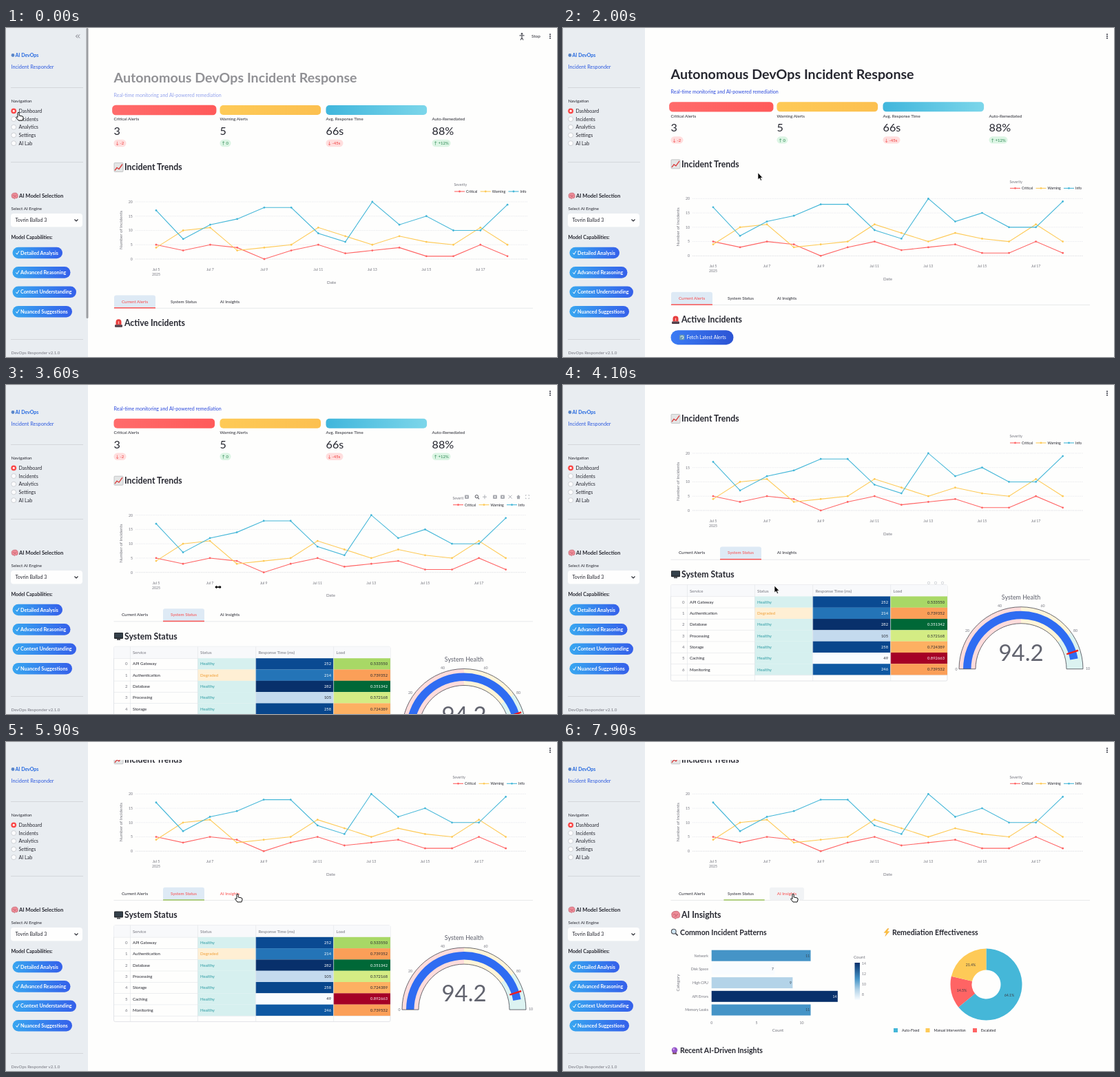
Animation of 800 by 477 pixels, one loop 8000 ms. Source, as an HTML page:

```html
<!DOCTYPE html>
<html lang="en">
<head>
<meta charset="utf-8">
<title>Incident dashboard</title>
<style>
html, body { margin: 0; width: 100%; height: 100%; overflow: hidden; background: #fefefd; }
svg { display: block; width: 800px; height: 477px; font-family: Lato, "DejaVu Sans", sans-serif; fill: #262730; }
.b { font-weight: 700; }
.m { text-anchor: middle; }
.e { text-anchor: end; }
</style>
</head>
<body>
<svg id="stage" viewBox="0 0 800 477"></svg>
<script>
const INK = '#262730', RED = '#ff6464', YELLOW = '#feca57', BLUE = '#45b7d8', GREY = '#74757e', PAGE = '#fefefd';

// Drawing helpers: y of a text is the middle of its capitals
const text = (x, y, size, s, fill = INK, cls = '', more = '') =>
  `<text x="${x}" y="${y + size * .36}" font-size="${size}" fill="${fill}" class="${cls}" ${more}>${s}</text>`;
const rect = (x, y, w, h, fill, r = 0, more = '') =>
  `<rect x="${x}" y="${y}" width="${w}" height="${h}" rx="${r}" fill="${fill}" ${more}/>`;
const dot = (x, y, r, fill, more = '') => `<circle cx="${x}" cy="${y}" r="${r}" fill="${fill}" ${more}/>`;
const path = (d, stroke, w = 1, fill = 'none', more = '') =>
  `<path d="${d}" stroke="${stroke}" stroke-width="${w}" fill="${fill}" ${more}/>`;
const group = (id, body, more = '') => `<g id="${id}" ${more}>${body}</g>`;
const each = (list, fn) => list.map(fn).join('');
const gradient = (id, a, b) =>
  `<linearGradient id="${id}"><stop stop-color="${a}"/><stop offset="1" stop-color="${b}"/></linearGradient>`;

// Ring sector, angles in radians clockwise from the top
function sector(cx, cy, r0, r1, a, b, fill, stroke = 'none', w = 0) {
  const p = (r, t) => `${cx + r * Math.sin(t)} ${cy - r * Math.cos(t)}`;
  const big = b - a > Math.PI ? 1 : 0;
  return path(`M${p(r1, a)}A${r1} ${r1} 0 ${big} 1 ${p(r1, b)}L${p(r0, b)}A${r0} ${r0} 0 ${big} 0 ${p(r0, a)}Z`, stroke, w, fill);
}

// Small heading symbols, 13 units wide
const icons = {
  chart: rect(0, 0, 13, 13, '#e4e6e6', 1, 'stroke="#a8aaac" stroke-width=".6"') + path('M1 11L4 7L7 9L12 2', '#d83a3a', 1.3),
  siren: path('M2.5 9V5a4 4 0 0 1 8 0v4z', 'none', 0, '#e63c3c') + rect(1, 9, 11, 3.5, '#54404a', 1) + path('M6.5 4v4', '#ffb7b0', 1.4),
  brain: path('M1 7C0 3 3 1 6 1C10 0 13 3 12.5 7C13 10 10 11 8 10.5C7 12.5 5 12 4.5 10.5C2 11 1 9 1 7Z', '#b8505e', .7, '#ec8c98')
    + path('M3 6q2-2 3 0t4-1M5 9q1-2 3-1', '#b8505e', .7),
  screen: rect(0, 1, 13, 9, '#26282c', 1) + rect(1, 2, 11, 6.5, '#34404a') + rect(4, 10, 5, 2, '#505258'),
  lens: path('M8 8L12 12', '#44464c', 2) + dot(5, 5, 4, '#cfe6f4', 'stroke="#505258" stroke-width="1.2"'),
  bolt: path('M8 0L2 7H6L4 13L11 5H7L10 0Z', '#e89a30', .5, '#ffc23a'),
  orb: rect(3, 9.5, 7, 3, '#6a4640', 1) + dot(6.5, 5.5, 5, '#9456c8') + dot(5, 4, 1.5, '#d8a8f0')
};
const icon = (name, x, y, k = 1) => `<g transform="translate(${x} ${y - 6.5 * k}) scale(${k})">${icons[name]}</g>`;
const heading = (name, y, s) => icon(name, 157, y) + text(172, y, 12.3, s, INK, 'b');
const subheading = (name, x, y, s) => icon(name, x, y, .85) + text(x + 13.5, y, 10.6, s, INK, 'b');

function sidebar() {
  const nav = ['Dashboard', 'Incidents', 'Analytics', 'Settings', 'AI Lab'];
  const skills = [['Detailed Analysis', 72.5], ['Advanced Reasoning', 84], ['Context Understanding', 92.5], ['Nuanced Suggestions', 86.5]];
  return rect(0, 0, 119, 477, '#e9edf1')
    + dot(10, 39.5, 2.4, '#5a86c8') + text(13.5, 39.5, 7, 'AI DevOps', '#2468e0', 'b')
    + text(7.5, 56, 7.3, 'Incident Responder', '#2f5ce0')
    + each([86, 194, 451], y => rect(7, y, 105, .8, '#d0d3d6'))
    + text(7.5, 106, 6.35, 'Navigation')
    + each(nav, (s, i) => {
      const y = 120.3 + i * 11.7;
      return (i ? dot(11.2, y, 3.5, '#fdfdfe', 'stroke="#c4c7cc" stroke-width=".8"') : dot(11.2, y, 3.9, '#fa4848') + dot(11.2, y, 1.5, '#fff'))
        + text(18.5, y, 7.1, s);
    })
    + icon('brain', 7.5, 243.5, .78) + text(19, 243.5, 7.6, 'AI Model Selection', INK, 'b')
    + text(7.5, 261.5, 6.3, 'Select AI Engine')
    + rect(7, 269, 104, 19.5, '#fefefe', 4) + text(13.5, 278.5, 7.1, 'Tovrin Ballad 3')
    + path('M99.5 277.5l2.5 2.5l2.5-2.5', INK, 1.1)
    + text(7.5, 303.5, 7.05, 'Model Capabilities:', INK, 'b')
    + each(skills, ([s, w], i) => {
      const y = 326 + i * 28.4;
      return rect(9.5, y - 8.3, w, 16.6, 'url(#pill)', 8.3) + path(`M14.5 ${y}l1.6 2.2l3-5`, '#fff', 1)
        + text(21, y, 7.2, s, '#fff', 'b');
    })
    + text(7.5, 471, 6.2, 'DevOps Responder v2.1.0', GREY);
}

function metrics() {
  const cards = [
    ['Critical Alerts', '3', '↓ -2', 18], ['Warning Alerts', '5', '↑ 0', 16],
    ['Avg. Response Time', '66s', '↓ -45s', 25], ['Auto-Remediated', '88%', '↑ +12%', 27]];
  return each(cards, ([label, value, delta, w], i) => {
    const x = 156.5 + i * 154, down = delta[0] === '↓';
    return (i < 3 ? rect(x, 112, 146.6, 14, `url(#card${i})`, 5, `id="bar${i}"`) : '')
      + text(x, 132, 6.2, label) + text(x, 149, 16.2, value)
      + rect(x, 161.8, w, 10.4, down ? '#ffdede' : '#dcf5e4', 5.2)
      + text(x + 3, 167, 6, delta, down ? '#f03838' : '#208048');
  });
}

function trends() {
  const series = [
    ['Critical', RED, [5, 3, 5, 4, 0, 3, 5, 2, 3, 4, 1, 1, 5, 1], 649],
    ['Warning', YELLOW, [4, 10, 11, 3, 4, 5, 11, 8, 5, 8, 6, 5, 11, 5], 686.5],
    ['Info', BLUE, [17, 7, 12, 14, 18, 18, 9, 6, 20, 12, 15, 10, 10, 19], 727]];
  const X = i => 218 + i * 39.05, Y = v => 335 - v * 4.15;
  return each([0, 5, 10, 15, 20], v =>
      path(`M188 ${Y(v)}H755`, v ? '#e6e8ec' : '#d8dadf', .8, 'none', 'stroke-dasharray="1.5 1"') + text(184, Y(v), 5.2, v, GREY, 'e'))
    + each([5, 7, 9, 11, 13, 15, 17], d => text(X(d - 5), 350, 5.2, 'Jul ' + d, GREY, 'm'))
    + text(218, 357, 5.2, '2025', GREY, 'm') + text(471.5, 368.5, 6.2, 'Date', GREY, 'm')
    + text(0, 0, 6.3, 'Number of Incidents', GREY, 'm', 'transform="translate(167 293) rotate(-90)"')
    + text(648.5, 227.5, 5.2, 'Severity', GREY)
    + each(series, ([name, c, data, x]) =>
      path('M' + data.map((v, i) => X(i) + ' ' + Y(v)).join('L'), c, 1.1)
      + each(data, (v, i) => dot(X(i), Y(v), 1.4, c))
      + path(`M${x} 237h15`, c, 1.1) + dot(x + 7.5, 237, 1.4, c) + text(x + 17, 237, 5.2, name));
}

function modebar() {
  return rect(664, 220, 101, 11, PAGE)
    + each([669, 684, 695, 710, 721, 732, 744, 757], (x, i) => {
      const c = i === 1 ? '#55565e' : '#a8aab0';
      if (i === 1) return dot(x - .6, 225, 2.2, 'none', `stroke="${c}"`) + path(`M${x + 1} 226.6l2 2`, c, 1.1);
      if (i === 2) return path(`M${x - 3} 225.5h6m-3-3v6`, c, .9);
      if (i === 5) return path(`M${x - 2.5} 223l5 5m0-5l-5 5`, c, .9);
      if (i === 6) return path(`M${x - 3} 225.5l3-3l3 3h-1v3h-4v-3z`, 'none', 0, c);
      if (i === 7) return rect(x - 2.5, 223, 5, 5, 'none', 0, `stroke="${c}" stroke-dasharray="2 3" stroke-dashoffset="1"`);
      return rect(x - 3, 222.8, 6, 5.4, c, 1) + dot(x, 225.5, 1, PAGE);
    });
}

function alerts() {
  return heading('siren', 427.7, 'Active Incidents')
    + group('fetch', rect(156.5, 442.8, 91, 21, 'url(#button)', 10.5)
      + rect(169, 449.5, 7.5, 7.5, '#6a9cb4', 1.5) + path('M170.8 453a2 2 0 1 1 2 2.2', '#fff', .9)
      + text(179.5, 453.4, 7, 'Fetch Latest Alerts', '#fff'));
}

function status() {
  const rows = [
    ['API Gateway', 252, '#0a4a92', '0.533550', '#a8d866'], ['Authentication', 214, '#2474b7', '0.739352', '#fb9f58'],
    ['Database', 282, '#08306b', '0.351342', '#006837'], ['Processing', 105, '#c4daee', '0.572168', '#d4ec84'],
    ['Storage', 258, '#08468c', '0.724389', '#fdb062'], ['Caching', 49, '#f9fcff', '0.892663', '#a50026'],
    ['Monitoring', 246, '#0e58a2', '0.739532', '#fb9f58']];
  const top = 442.6, rowY = i => 459.5 + i * 16.3, line = '#e2e4e8';
  const cx = 665, cy = 564.8, at = f => (f - .5) * Math.PI;
  const ring = (r0, r1, a, b, c, s, w) => sector(cx, cy, r0, r1, at(a), at(b), c, s, w);
  return heading('screen', 427.7, 'System Status')
    + rect(156.5, top, 401.5, 139.5, 'none', 2, `stroke="${line}"`) + rect(156.5, top, 401.5, 16.9, '#f8f9fb')
    + each([['Service', 184], ['Status', 282], ['Response Time (ms)', 366.5], ['Load', 479.5]], ([s, x]) => text(x, 451.5, 6.1, s, GREY))
    + each(rows, ([name, ms, c, load, lc], i) => {
      const y = rowY(i), mid = y + 8.1, ok = i !== 1, dark = ms > 200, deep = i === 2 || i === 5;
      return rect(278, y, 84.5, 16.4, ok ? '#d6f0ef' : '#ffefd4') + rect(362.5, y, 113, 16.4, c) + rect(475.5, y, 82.5, 16.4, lc)
        + rect(156.5, y, 122, .6, line)
        + text(176.5, mid, 6.1, i, GREY, 'e') + text(184, mid, 6.1, name)
        + text(282, mid, 6.1, ok ? 'Healthy' : 'Degraded', ok ? '#2a9aa2' : '#f0a038')
        + text(472, mid, 5.8, ms, dark ? '#fff' : INK, 'e') + text(554, mid, 5.8, load, deep ? '#fff' : INK, 'e');
    })
    + rect(156.5, rowY(7), 401.5, .6, line) + each([180, 278, 362.5, 475.5], x => rect(x, top, .6, 139.5, line))
    + text(cx, 460.8, 8.9, 'System Health', '#5c5e6a', 'm')
    + ring(66, 90, 0, .5, '#ffdcdc') + ring(66, 90, .5, .8, '#fff4d8') + ring(66, 90, .8, 1, '#dcf3f1')
    + ring(72.5, 84, 0, .942, '#2f6cf2') + ring(66, 90, 0, 1, 'none', '#44464e', .8)
    + ring(70, 87, .897, .903, '#f01c1c', '#f01c1c', 1)
    + each([['0', 571, 388], ['20', 587, 332.5], ['40', 634, 296.5], ['60', 696.5, 296.5], ['80', 744, 332.5], ['10', 762, 387.5]],
      ([s, x, y]) => text(x, y + 176.7, 5.2, s, GREY, 'm'))
    + text(cx, 541, 33, '94.2', '#62646f', 'm');
}

function insights() {
  const bars = [['Network', 11, '#4594c7'], ['Disk Space', 7, '#f9fcff'], ['High CPU', 9, '#b3d3e8'], ['API Errors', 14, '#08306b'], ['Memory Leaks', 11, '#4594c7']];
  const turn = 2 * Math.PI, slice = (a, b, c) => sector(614.5, 351.5, 21, 52, a * turn, b * turn, c);
  const X = v => 215.7 + v * 13.08;
  return `<g transform="translate(0 176.7)">` + heading('brain', 251, 'AI Insights')
    + subheading('lens', 156.5, 276, 'Common Incident Patterns') + subheading('bolt', 464.5, 276, 'Remediation Effectiveness')
    + each(bars, ([s, v, c], i) => {
      const y = 309.7 + i * 19.7;
      return rect(X(0), y - 8, v * 13.08, 16, c) + text(211, y, 5.3, s, GREY, 'e')
        + text(v === 7 ? 306 : X(v) - 1.5, y, 5, v, v === 14 ? '#fff' : '#34404c', 'e');
    })
    + each([0, 5, 10], v => text(X(v), 407, 5.2, v, GREY, 'm'))
    + text(312, 418, 6.2, 'Count', GREY, 'm')
    + text(0, 0, 6.2, 'Category', GREY, 'm', 'transform="translate(167 349) rotate(-90)"')
    + text(422, 311.5, 6.2, 'Count', GREY) + rect(423.5, 320, 7.5, 54, 'url(#scale)')
    + each([14, 12, 10, 8], (v, i) => text(434, 320.7 + i * 15.2, 5, v, GREY))
    + slice(0, .641, BLUE) + slice(.641, .786, RED) + slice(.786, 1, YELLOW)
    + each([['64.1%', 648, 367], ['21.4%', 592, 323], ['14.5%', 579, 360]], ([s, x, y]) => text(x, y, 5.3, s, '#3a3b44', 'm'))
    + each([['Auto-Fixed', 480, BLUE], ['Manual Intervention', 526.5, YELLOW], ['Escalated', 595, RED]],
      ([s, x, c]) => rect(x, 415, 6, 6, c) + text(x + 12, 418, 5.2, s))
    + subheading('orb', 156.5, 447.5, 'Recent AI-Driven Insights') + '</g>';
}

const tabs = [['Current Alerts', 157, 60], ['System Status', 228, 60], ['AI Insights', 300, 50]];
const tabBar = () => rect(156.5, 405.8, 608.5, .8, '#e2e4e6')
  + each(tabs, ([s, x, w], i) => rect(x, 387.5, w, 18.5, '#deeaf5', 3, `id="tabBox${i}"`) + text(x + w / 2, 396.3, 6.2, s, INK, 'm', `id="tab${i}"`))
  + rect(0, 405, 60, 1.5, RED, 0, 'id="underline"');

const cursors = {
  arrow: path('M0 0V10L2.3 8L4 11.5L5.6 10.8L4 7.4H7Z', '#fff', .7, '#000'),
  hand: path('M-1 1Q0-1 1.2 1V5L6 6Q7.5 6.5 7 9L6 12H0L-3.5 7.5Q-3 6-1 7.5Z', '#111', 1, '#fff'),
  resize: path('M-5 0L-2-3V-1.2H2V-3L5 0L2 3V1.2H-2V3Z', '#fff', .6, '#000')
};

const stage = document.getElementById('stage');
stage.innerHTML = '<defs>' + gradient('pill', '#38a6f0', '#3560ea') + gradient('button', '#3b7cf4', '#2c54d4')
  + gradient('card0', '#ff6b6b', '#ff5a5a') + gradient('card1', YELLOW, '#fcc050') + gradient('card2', '#40b6dc', '#7cd6ea')
  + '<linearGradient id="scale" x2="0" y2="1"><stop stop-color="#08306b"/><stop offset=".43" stop-color="#4594c7"/>'
  + '<stop offset=".72" stop-color="#b3d3e8"/><stop offset="1" stop-color="#f9fcff"/></linearGradient></defs>'
  + rect(0, 0, 800, 477, PAGE)
  + group('page',
    group('title', text(156.5, 72, 19.66, 'Autonomous DevOps Incident Response', INK, 'b')
      + text(156.5, 97.3, 7.1, 'Real-time monitoring and AI-powered remediation', '#2a48dc'))
    + metrics() + heading('chart', 202, 'Incident Trends')
    + group('link', path('M265 201.5h-1a1.7 1.7 0 0 0 0 3.4h1m2-3.4h1a1.7 1.7 0 0 1 0 3.4h-1m-2.5-1.7h3', '#85868e', .9))
    + group('trends', trends()) + group('modebar', modebar()) + tabBar()
    + group('panel0', alerts()) + group('panel1', status()) + group('panel2', insights())
    + group('tools', each([531, 541, 551], x => rect(x - 1.5, 438.5, 3, 3, 'none', .5, 'stroke="#c8cad0" stroke-width=".7"'))))
  + rect(119, 0, 681, 26, PAGE) + sidebar()
  + group('expand', path('M104 9.5l-2.5 2.5l2.5 2.5m3-5l-2.5 2.5l2.5 2.5', GREY, 1) + rect(116.5, 0, 3, 421, '#9c9ea2', 1.5))
  + group('running', dot(749, 8.4, 1.4, '#55565e') + path('M745.5 10.8h7m-3.5 0v3.2l-2 3.5m2-3.5l2 3.5', '#55565e', 1.2) + text(763, 12, 6.4, 'Stop'))
  + each([9.2, 12, 14.8], y => dot(790, y, 1, '#31333f'))
  + each(Object.keys(cursors), k => group(k, cursors[k]));

const $ = id => document.getElementById(id);
const show = (id, on) => $(id).setAttribute('visibility', on ? 'visible' : 'hidden');
const smooth = x => (x = Math.min(1, Math.max(0, x)), x * x * (3 - 2 * x));

// Eased value from rows of [time, value, value...]
function track(rows, t) {
  let i = 0;
  while (i < rows.length - 2 && t >= rows[i + 1][0]) i++;
  const a = rows[i], b = rows[i + 1], k = smooth((t - a[0]) / (b[0] - a[0]));
  return a.slice(1).map((v, j) => v + (b[j + 1] - v) * k);
}

const scrollTrack = [[0, 0], [1900, 0], [2500, 61.5], [2900, 61.5], [3050, 63.3], [3600, 63.3], [4300, 175], [4600, 175], [4800, 176.7], [8000, 176.7]];
const mouseTrack = [[0, 18, 122], [400, 18, 122], [1300, 283, 208], [2200, 283, 210], [2600, 269, 326], [2850, 260, 332], [3050, 260, 332],
  [3600, 308, 293], [3900, 307, 291], [4800, 307, 291], [5700, 336, 220], [7900, 334, 220], [8000, 334, 220]];

function pulse(t) {
  const p = ((t + 400) % 2000) / 1000, out = x => 1 - (1 - x) ** 2;
  return 1 + .05 * (p < 1 ? out(p) : 1 - out(p - 1));
}

function draw(t) {
  const tab = t < 2900 ? 0 : t < 7800 ? 1 : 2, busy = t < 500;
  const [scroll] = track(scrollTrack, t), [mx, my] = track(mouseTrack, t);
  $('page').setAttribute('transform', `translate(0 ${-scroll})`);
  $('title').setAttribute('opacity', busy ? .5 : .5 + .5 * smooth((t - 500) / 300));
  const k = pulse(t);
  $('bar0').setAttribute('transform', `translate(229.8 119) scale(${k}) translate(-229.8 -119)`);
  $('trends').setAttribute('transform', busy ? 'matrix(1.0047 0 0 1 -1.02 0)' : '');
  show('fetch', tab === 0 && !busy);
  show('running', t < 700);
  show('expand', t < 700);
  show('link', t > 1000 && t < 2000);
  show('modebar', (t > 2100 && t < 2800) || (t > 3250 && t < 3900));
  show('tools', t > 4000 && t < 5300);

  tabs.forEach((_, i) => {
    show('panel' + i, i === tab);
    show('tabBox' + i, i === tab);
    $('tab' + i).setAttribute('fill', i === tab || (i === 2 && t > 5600) ? '#fa4848' : INK);
  });
  $('tabBox2').setAttribute('fill', '#f1f3f5');
  const [ux, uw] = track([[0, 157, 60], [2900, 157, 60], [3150, 228, 60], [7800, 228, 60], [8400, 300, 50]], t);
  $('underline').setAttribute('x', ux);
  $('underline').setAttribute('width', uw);
  $('underline').setAttribute('fill', t < 5400 ? '#fa5454' : '#9cc45c');

  const kind = t < 500 || (t > 2750 && t < 3200) || t > 5550 ? 'hand' : t > 3350 && t < 3750 ? 'resize' : 'arrow';
  for (const name in cursors) show(name, name === kind);
  $(kind).setAttribute('transform', `translate(${mx} ${my})`);
}

const start = performance.now();
function loop() {
  draw((performance.now() - start) % 8000);
  requestAnimationFrame(loop);
}
loop();
</script>
</body>
</html>
```
